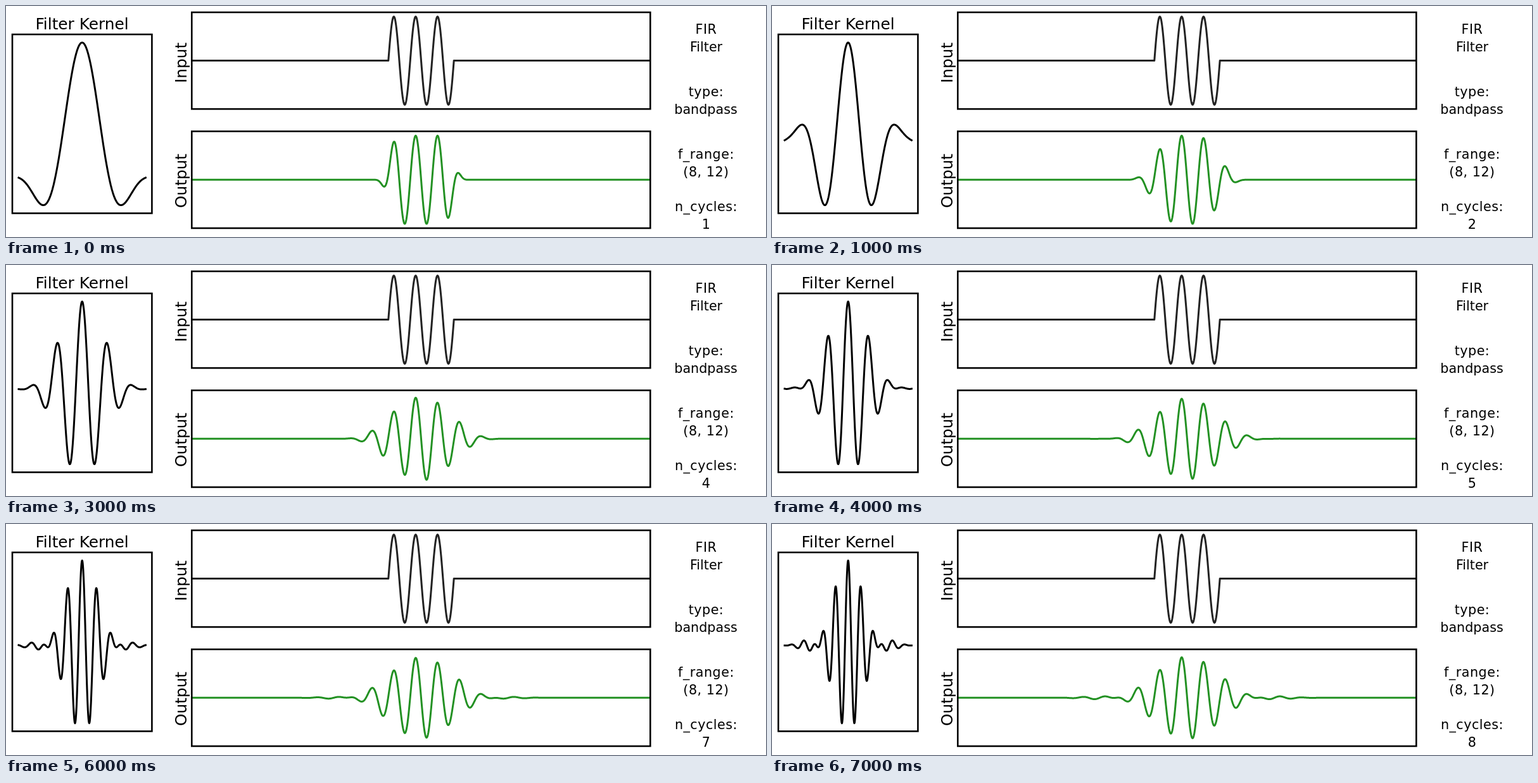
Animation of 1200x366 px, one loop 8 s. Source, as an HTML page:

```html
<!DOCTYPE html>
<html lang="en">
<head>
<meta charset="utf-8">
<title>FIR filter length</title>
<style>
  html, body { margin: 0; width: 100%; height: 100%; overflow: hidden; background: #fff; }
  svg { display: block; width: 1200px; height: 366px; }
  text { font-family: "DejaVu Sans", sans-serif; text-anchor: middle; }
  .label { font-size: 24.8px; }
  .info { font-size: 20.7px; }
  .wide { letter-spacing: .5px; }
  .box { fill: none; stroke: #000; stroke-width: 2.6; }
  .line { fill: none; stroke: #000; stroke-width: 3; stroke-linejoin: round; }
  .kernel { stroke-linecap: square; }
  .input { stroke: #222; }
  .output { stroke: #239123; }
  .step { opacity: 0; animation: show 8s step-end infinite; }
  @keyframes show {
    0% { opacity: 1; }
    12.5%, 100% { opacity: 0; }
  }
</style>
</head>
<body>
<svg viewBox="0 0 1200 366">
  <g id="plots"></g>
  <rect class="box" x="10" y="45" width="220.4" height="283.4"/>
  <rect class="box" x="293.3" y="10" width="724" height="153.2"/>
  <rect class="box" x="293.3" y="198.6" width="724" height="153.4"/>
  <text class="label" x="120" y="37.3">Filter Kernel</text>
  <text class="label" transform="translate(285 90) rotate(-90)">Input</text>
  <text class="label" transform="translate(285 277) rotate(-90)">Output</text>
  <g class="info">
    <text class="wide" x="1105.5" y="44.2">FIR</text>
    <text x="1105.5" y="71.8">Filter</text>
    <text class="wide" x="1105.5" y="143.2">type:</text>
    <text x="1105" y="170.8">bandpass</text>
    <text class="wide" x="1105.5" y="242.2">f_range:</text>
    <text class="wide" x="1105.5" y="269.8">(8, 12)</text>
    <text class="wide" x="1105.5" y="325">n_cycles:</text>
  </g>
</svg>
<script>
  const FS = 1000, LOW = 8, HIGH = 12, MID = (LOW + HIGH) / 2;
  const COUNT = 2100, START = 900, BURST = 300;
  const plots = document.getElementById('plots');
  const TAU = 2 * Math.PI;

  function add(parent, tag, attrs, text = '') {
    const el = document.createElementNS('http://www.w3.org/2000/svg', tag);
    for (const key in attrs) el.setAttribute(key, attrs[key]);
    el.textContent = text;
    parent.append(el);
    return el;
  }

  function drawLine(parent, name, values, toX, toY) {
    const points = Array.from(values, (v, i) => toX(i).toFixed(2) + ',' + toY(v).toFixed(2));
    add(parent, 'polyline', { class: 'line ' + name, points: points.join(' ') });
  }

  // Hamming-windowed band-pass with unit gain at the middle of the band
  function makeKernel(cycles) {
    const half = Math.floor(Math.ceil(FS * cycles / LOW) / 2);
    const taps = [];
    let gain = 0;
    for (let i = -half; i <= half; i++) {
      const t = i / FS;
      const ideal = i ? (Math.sin(TAU * HIGH * t) - Math.sin(TAU * LOW * t)) / (Math.PI * t)
                      : 2 * (HIGH - LOW);
      const tap = ideal * (0.54 + 0.46 * Math.cos(Math.PI * i / half));
      taps.push(tap);
      gain += tap * Math.cos(TAU * MID * t);
    }
    return taps.map(tap => tap / gain);
  }

  function convolve(signal, taps) {
    const half = (taps.length - 1) / 2;
    const out = new Float64Array(COUNT);
    for (let i = START; i < START + BURST; i++) {
      taps.forEach((tap, k) => {
        const j = i + k - half;
        if (j >= 0 && j < COUNT) out[j] += signal[i] * tap;
      });
    }
    return out;
  }

  const signal = Array.from({ length: COUNT }, (_, i) =>
    i >= START && i < START + BURST ? Math.sin(TAU * MID * (i - START) / FS) : 0);
  const timeX = i => 293.3 + i * 724 / (COUNT - 1);
  drawLine(plots, 'input', signal, timeX, v => 86.6 - 69.8 * v);

  for (let n = 1; n <= 8; n++) {
    const step = add(plots, 'g', { class: 'step' });
    step.style.animationDelay = (n - 9) + 's';

    const taps = makeKernel(n);
    const max = Math.max(...taps), min = Math.min(...taps);
    drawLine(step, 'kernel', taps,
      i => 20 + 200.4 * i / (taps.length - 1),
      v => 57.9 + 257.7 * (max - v) / (max - min));
    drawLine(step, 'output', convolve(signal, taps), timeX, v => 275.3 - 69.8 * v);
    add(step, 'text', { class: 'info', x: 1105.3, y: 352.5 }, n);
  }
</script>
</body>
</html>
```
